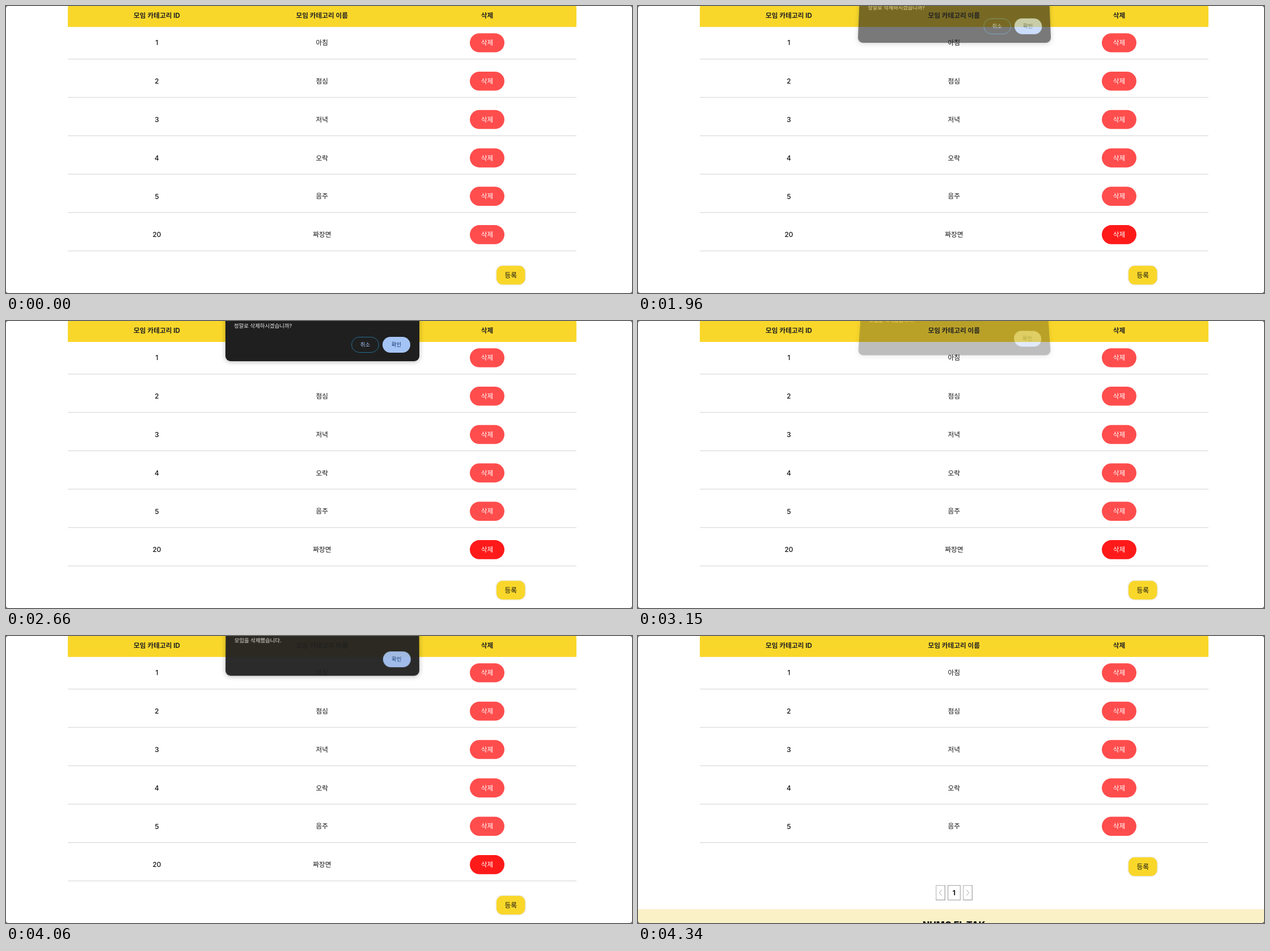
These frames come from a looping animation (1104x507 px, 6.65 s). An HTML page with a canvas:

```html
<!DOCTYPE html>
<html lang="ko">
<head>
<meta charset="utf-8">
<style>
  html, body { margin: 0; width: 100%; height: 100%; overflow: hidden; background: #fff; }
  #stage { position: relative; width: 1104px; height: 507px; overflow: hidden; }
  canvas { display: block; }
  #dialog {
    position: absolute; left: 386.5px; top: -60px; width: 342px; height: 131px;
    border-radius: 9px; background: #1f1f1f; transform-origin: 50% 100%;
    box-shadow: 0 1px 9px rgba(0, 0, 0, .3);
    font: 400 9.4px Inter, "Noto Sans CJK KR", "Noto Sans CJK", sans-serif;
  }
  #dialog * { position: absolute; box-sizing: border-box; white-space: nowrap; }
  #message { left: 15.5px; top: 61.5px; line-height: 14px; color: #ececec; }
  .pill {
    top: 88px; width: 49px; height: 27.5px; border-radius: 14px;
    line-height: 27.5px; text-align: center; font-weight: 500;
  }
  #cancel { left: 222.5px; border: 1px solid #246f94; line-height: 25.5px; color: #a8c7fa; }
  #confirm { left: 277.5px; color: #0b2f66; }
</style>
</head>
<body>
<div id="stage">
  <canvas id="page" width="1104" height="507"></canvas>
  <div id="dialog">
    <div id="message"></div>
    <div id="cancel" class="pill">취소</div>
    <div id="confirm" class="pill">확인</div>
  </div>
</div>
<script>
const LOOP = 6650, STEP = 70;
const W = 1104, H = 507;
const HOVER_AT = 1260, SECOND_AT = 3150, REMOVED_AT = 4130;
const FONT = 'Inter, "Noto Sans CJK KR", "Noto Sans CJK", sans-serif';
const YELLOW = '#f9d72a';
const ROWS = [['1', '아침'], ['2', '점심'], ['3', '저녁'], ['4', '오락'], ['5', '음주'], ['20', '짜장면']];
const ROW_H = 67.78;

// [time, opacity] of the dialog
const FADE = [
  [1820, 0], [1890, .2], [1960, .6], [2030, .9], [2100, 1],
  [2940, 1], [3010, .8], [3080, .4], [3150, .3], [3220, .75], [3290, 1],
  [3990, 1], [4060, .95], [4130, .8], [4200, .5], [4270, .2], [4340, 0]
];
// [time, shade] of the confirm button
const PRESS = [[2590, 0], [2870, 1]];

const $ = id => document.getElementById(id);
const ctx = $('page').getContext('2d');
const dialog = $('dialog'), message = $('message'), cancel = $('cancel'), confirmBtn = $('confirm');

function valueAt(keys, t) {
  if (t <= keys[0][0]) return keys[0][1];
  for (let i = 1; i < keys.length; i++) {
    const [t0, v0] = keys[i - 1], [t1, v1] = keys[i];
    if (t <= t1) return v0 + (v1 - v0) * (t - t0) / (t1 - t0);
  }
  return keys[keys.length - 1][1];
}

function rect(x, y, w, h, color) {
  ctx.fillStyle = color;
  ctx.fillRect(x, y, w, h);
}

function round(x, y, w, h, r, color) {
  ctx.fillStyle = color;
  ctx.beginPath();
  ctx.roundRect(x, y, w, h, r);
  ctx.fill();
}

function text(str, x, cy, color = '#111', weight = 500, size = 11.7) {
  ctx.font = `${weight} ${size}px ${FONT}`;
  ctx.textAlign = 'center';
  ctx.fillStyle = color;
  ctx.fillText(str, x, cy + size * .37);
}

function drawTable(count, hover) {
  round(109, -4, 897, 41, [7, 7, 0, 0], YELLOW);
  text('모임 카테고리 ID', 266, 16.5, '#222', 700);
  text('모임 카테고리 이름', 557.3, 16.5, '#222', 700);
  text('삭제', 848.5, 16.5, '#222', 700);
  ROWS.slice(0, count).forEach(([id, name], i) => {
    const y = 65 + i * ROW_H;
    text(id, 266, y, '#111', 500, 12);
    text(name, 557.3, y);
    round(818, y - 16.8, 61, 33.6, 16.8, hover && i === 5 ? '#ff1a1a' : '#ff4d4d');
    text('삭제', 848.5, y, '#fff');
    rect(109, y + 28, 897, 1.4, '#dedede');
  });
}

function drawAdd(y) {
  ctx.save();
  ctx.shadowColor = 'rgba(0, 0, 0, .22)';
  ctx.shadowBlur = 3;
  round(865, y, 50.5, 33, 11, YELLOW);
  ctx.restore();
  text('등록', 890.2, y + 16.6, '#111');
}

function drawArrow(x, dir) {
  rect(x, 440, 17, 27, '#a8a8a8');
  rect(x, 440, 15.6, 25.6, '#c4c4c4');
  rect(x + 1.4, 441.4, 14.2, 24.2, '#fff');
  ctx.strokeStyle = '#a3a3a3';
  ctx.lineWidth = 1;
  ctx.beginPath();
  ctx.moveTo(x + 8.5 + dir * 2, 448.5);
  ctx.lineTo(x + 8.5 - dir * 2, 453.5);
  ctx.lineTo(x + 8.5 + dir * 2, 458.5);
  ctx.stroke();
}

function drawBottom() {
  drawArrow(525, 1);
  drawArrow(573, -1);
  rect(546, 440, 23, 27, '#aaa');
  rect(547.2, 441.2, 20.6, 24.6, '#fff');
  text('1', 557.3, 453.6, '#111', 700, 12);
  rect(0, 482.5, W, 25, '#fbf1c7');
  text('NUMO EL TAK', 557.3, 510, '#111', 800, 16);
}

function drawCorners() {
  ctx.fillStyle = '#555';
  ctx.beginPath();
  ctx.rect(0, 0, W, H);
  ctx.roundRect(0, 0, W, H, 4);
  ctx.fill('evenodd');
}

function drawPage(t) {
  const removed = t >= REMOVED_AT;
  rect(0, 0, W, H, '#fff');
  drawTable(removed ? 5 : 6, t >= HOVER_AT);
  drawAdd(removed ? 391 : 459);
  if (removed) drawBottom();
  drawCorners();
}

function poseDialog(t) {
  const alpha = valueAt(FADE, t), away = 1 - alpha;
  const second = t >= SECOND_AT;
  message.textContent = second ? '모임을 삭제했습니다.' : '정말로 삭제하시겠습니까?';
  cancel.style.display = second ? 'none' : 'block';
  const k = valueAt(PRESS, t);
  confirmBtn.style.background = `rgb(${168 - 12 * k}, ${199 - 14 * k}, ${250 - 17 * k})`;
  dialog.style.visibility = alpha > 0 ? 'visible' : 'hidden';
  dialog.style.opacity = alpha;
  // the top edge leans away while the dialog fades
  const sx = 1 - .008 * away, sy = 1 + .035 * away;
  dialog.style.transform = away === 0 ? 'none' :
    `matrix3d(${sx},0,0,0, 0,${sy},0,${-.00062 * away}, 0,0,1,0, 0,${-15 * away},0,1)`;
}

const start = performance.now();

function tick() {
  const elapsed = (performance.now() - start) % LOOP;
  const t = Math.floor(elapsed / STEP) * STEP;
  drawPage(t);
  poseDialog(t);
  requestAnimationFrame(tick);
}
tick();
</script>
</body>
</html>
```
